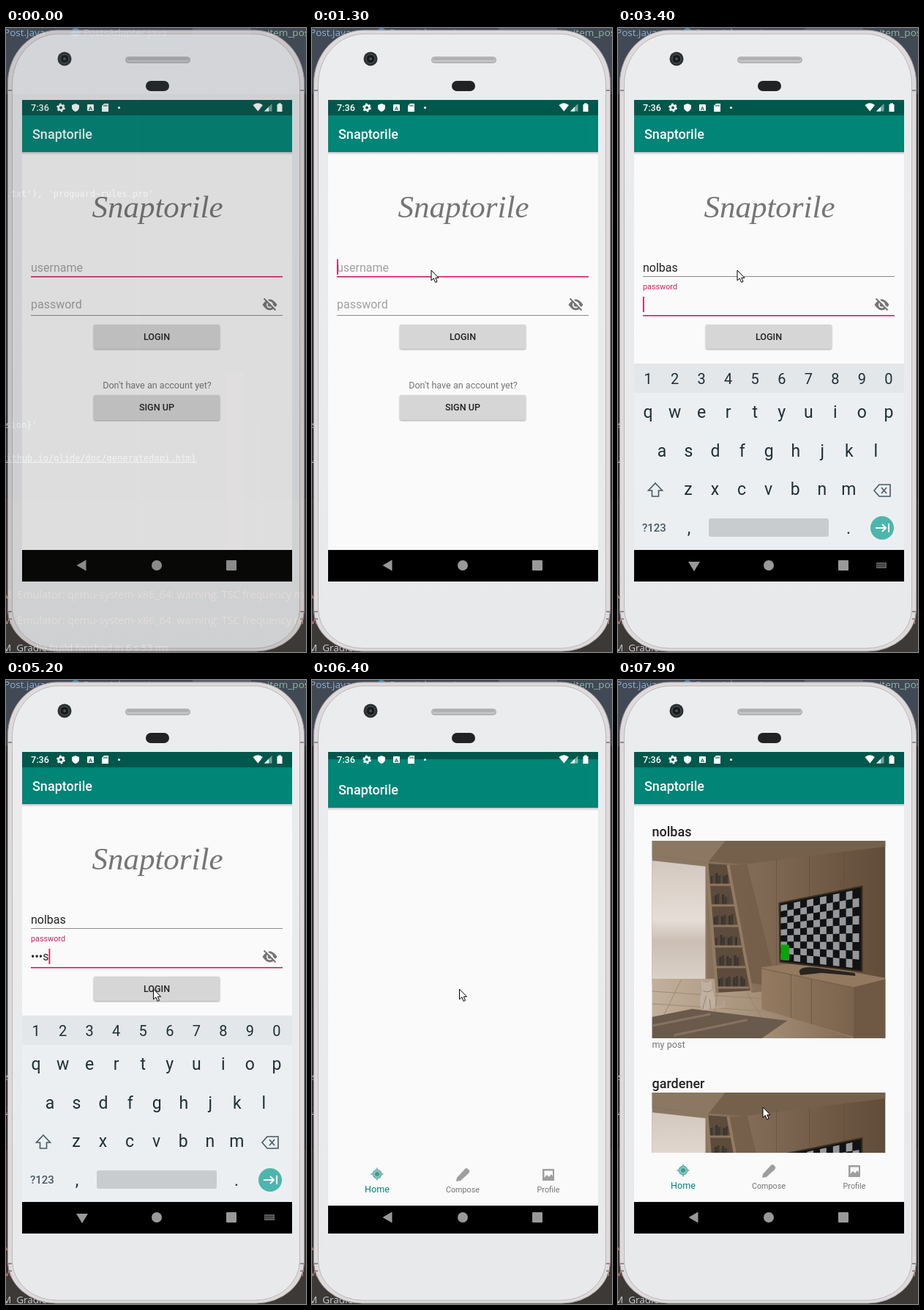
Recreate the animation shown at these times as an HTML page. Size 410x850 px, loop 8000 ms.

```html
<!DOCTYPE html>
<html lang="en">
<head>
<meta charset="utf-8">
<title>Login walkthrough</title>
<style>
  html, body { margin: 0; width: 100%; height: 100%; overflow: hidden; background: #34373c; }
  svg { display: block; width: 410px; height: 850px; }
  text { font-family: Roboto, sans-serif; font-size: 16px; white-space: pre; }
  .mid { text-anchor: middle; }
  .bold { font-weight: 500; }
  .title { font-size: 18px; font-weight: 500; }
  .small { font-size: 12.6px; }
  .tiny { font-size: 10.8px; }
  .grey { fill: #757575; }
  .code text { font: 12px "DejaVu Sans Mono", monospace; fill: #c8ccd2; }
  .code .ui { font: 13.5px "Open Sans", sans-serif; }
  .code .log { font: 14.3px "Open Sans", sans-serif; fill: #c98a82; }
  .logo { font: italic 43px "Liberation Serif", serif; fill: #757575; }
  .key { font-size: 23px; fill: #1f2f36; text-anchor: middle; }
  .num { font-size: 20px; }
  .drop { filter: drop-shadow(0 1px 1px rgba(0, 0, 0, .35)); }
</style>
</head>
<body>
<svg viewBox="0 0 410 850">
  <defs>
    <linearGradient id="body" x2="0" y2="1">
      <stop offset="0" stop-color="#ebecee"/><stop offset="1" stop-color="#e8e9eb"/>
    </linearGradient>
    <linearGradient id="wall">
      <stop offset="0" stop-color="#8f7a67"/><stop offset=".5" stop-color="#7f6853"/><stop offset="1" stop-color="#614c39"/>
    </linearGradient>
    <linearGradient id="glass" x2="0" y2="1">
      <stop offset="0" stop-color="#d3c8bf"/><stop offset=".5" stop-color="#e6ddd6"/>
      <stop offset=".68" stop-color="#cbbfb4"/><stop offset="1" stop-color="#dad0c7"/>
    </linearGradient>
    <linearGradient id="floor">
      <stop offset="0" stop-color="#c3b09c"/><stop offset=".5" stop-color="#a58f79"/><stop offset="1" stop-color="#7d6752"/>
    </linearGradient>
    <linearGradient id="wood">
      <stop offset="0" stop-color="#947a61"/><stop offset="1" stop-color="#7b634d"/>
    </linearGradient>
    <linearGradient id="under" x2="0" y2="1">
      <stop offset="0" stop-opacity=".22"/><stop offset="1" stop-opacity="0"/>
    </linearGradient>
    <clipPath id="screen"><rect x="22" y="98" width="369" height="656"/></clipPath>
    <clipPath id="app"><rect x="22" y="98" width="369" height="613"/></clipPath>
    <clipPath id="button"><rect x="120" y="404" width="172" height="33" rx="2"/></clipPath>
    <clipPath id="frame"><rect width="319" height="269"/></clipPath>

    <g id="room" clip-path="url(#frame)">
      <rect width="319" height="269" fill="url(#wall)"/>
      <path d="M0 0H319V8L126 32L0 22Z" fill="#75604c"/>
      <path d="M0 0H100L76 30L0 20Z" fill="#8c7763"/>
      <path d="M0 20L76 31V196H0Z" fill="#8b7763"/>
      <path d="M0 27L73 35V188H0Z" fill="url(#glass)"/>
      <path d="M0 188H90L150 196L290 269H0Z" fill="url(#floor)"/>
      <path d="M0 205L150 215M0 222L200 235M40 189L15 240M90 200L85 240M130 207L155 250" stroke="#917c67" opacity=".7" fill="none"/>
      <path d="M0 240L55 229L185 245L150 269H0Z" fill="#6a5a4c"/>
      <path d="M0 252L80 236M30 265L130 244" stroke="#857362" stroke-width="3"/>
      <path d="M130 32L172 203L136 207L104 33Z" fill="#6c5642" opacity=".55"/>
      <path d="M75 31L104 33L136 204L88 207Z" fill="#5d4c3c"/>
      <g id="shelves"></g>
      <path d="M75 31L89 207M104 33L136 204" stroke="#937a62" stroke-width="4"/>
      <path d="M170 24V172M215 20V75M262 14V65" stroke="#523f2f" opacity=".35"/>
      <path d="M150 172L205 166L319 187V269H275L150 229Z" fill="#937960"/>
      <path d="M150 174L275 200V267L150 229Z" fill="url(#wood)"/>
      <path d="M275 200L319 189V269H275Z" fill="#705944"/>
      <path d="M190 182V241M218 188V250M150 174L275 200L319 189" stroke="#65503c" stroke-opacity=".7" fill="none"/>
      <path d="M201 178Q203 170 226 173L277 180L278 184L232 180L203 183Z" fill="#29241f"/>
      <path d="M174 85L287 62V178L175 165Z" fill="#15130f" stroke="#3a3020" stroke-width="2"/>
      <g id="checks"></g>
      <path d="M82 226Q101 230 98 218" fill="none" stroke="#b3a291" stroke-width="3"/>
      <path d="M67 189L71 193H77L81 189L82 202Q89 217 85 228L68 231Q63 218 68 205Z" fill="#c0b0a0"/>
      <path d="M69 230L74 211M80 229L79 216M70 204Q76 208 82 203" fill="none" stroke="#8f7f70"/>
    </g>
    <g id="home-art" fill="#62b1a8">
      <circle r="6.500"/>
      <path d="M-.8-8.500H.8V8.500H-.8ZM-8.500-.8H8.500V.8H-8.500Z"/>
      <circle r="4.200" fill="none" stroke="#c2e0dc" stroke-width=".8"/><circle r="2.500" fill="#3d9a90"/>
    </g>
  </defs>

  <!-- desktop behind the phone -->
  <g class="code">
    <rect width="410" height="850" fill="#2f3136"/>
    <rect width="410" height="90" fill="#414954"/>
    <rect y="640" width="410" height="210" fill="#3c3936"/>
    <rect x="255" y="0" width="80" height="12" fill="#59636e"/>
    <rect x="300" y="470" width="25" height="242" fill="#45383a"/>
    <path d="M180 90V710M345 540V710" stroke="#4a4a4f"/>
    <text class="ui" x="-3" y="11" style="fill:#8eb1d6">Post.java</text>
    <circle cx="95" cy="6" r="6" fill="#4d91b8"/>
    <text class="ui" x="106" y="11" style="fill:#8eb1d6">PostsAdapter.java</text>
    <text class="ui" x="357" y="11" style="fill:#8fb9a5">item_post.xml</text>
    <text x="-15" y="230">te.txt'), 'proguard-rules.pro'</text>
    <text x="-8" y="545">rsion}'</text>
    <text x="-7" y="590" text-decoration="underline">github.io/glide/doc/generatedapi.html</text>
    <text class="log" x="-5" y="777">M  Emulator: qemu-system-x86_64: warning: TSC frequency m</text>
    <text class="log" x="-5" y="812">M  Emulator: qemu-system-x86_64: warning: TSC frequency m</text>
    <text class="ui" x="-5" y="849">M  Gradle build finished in 6 s 53 ms</text>
  </g>

  <g id="phone">
    <path d="M2.500 75A68 72 0 0 1 70.500 3H339.500A68 72 0 0 1 407.500 75V792A66 57 0 0 1 341.500 849H68.500A66 57 0 0 1 2.500 792Z" fill="#dedadb" stroke="#a69d9f"/>
    <path d="M8.500 77A63 69 0 0 1 71.500 8H338.500A63 69 0 0 1 401.500 77V791A61 54 0 0 1 340.500 845H69.500A61 54 0 0 1 8.500 791Z" fill="url(#body)" stroke="#bdb6b8"/>
    <path d="M3 85H8M402 85H407M3 795H8M402 795H407M3 805H8M402 805H407" stroke="#918b8d" stroke-width="2"/>
    <circle cx="80" cy="42" r="9.5" fill="#2d3031"/>
    <circle cx="80" cy="42" r="6" fill="#17191b" stroke="#565b5d"/>
    <circle cx="80" cy="42" r="2" fill="#46525d"/>
    <rect x="163.5" y="39.5" width="88" height="8" rx="4" fill="#c1c1c3" stroke="#a5a5a7"/>
    <path d="M166 42H249" stroke="#909092"/>
    <rect x="191" y="72" width="32" height="14" rx="7" fill="#202223"/>

    <g clip-path="url(#screen)">
      <rect x="22" y="98" width="369" height="656"/>

      <g id="login" clip-path="url(#app)">
        <rect x="22" y="98" width="369" height="613" fill="#fafafa"/>
        <rect x="22" y="98" width="369" height="71" fill="#008577"/>
        <rect x="22" y="169" width="369" height="4" fill="url(#under)"/>
        <text class="title" x="36" y="151" fill="#fff">Snaptorile</text>
        <text class="logo mid" x="207" y="258">Snaptorile</text>

        <text id="user" x="34" y="332"></text>
        <rect id="user-line" x="34" width="344"/>
        <text id="pass-hint" x="34" y="382" fill="#a0a0a0">password</text>
        <text id="pass-label" class="tiny" x="34" y="356" fill="#d81b60">password</text>
        <text id="pass" x="34" y="382" fill="#222"></text>
        <rect id="pass-line" x="34" width="344"/>
        <rect id="caret" width="1.8" height="21" fill="#d81b60"/>
        <g fill="#757575">
          <path d="M350.500 377Q360.500 362 370.500 377Q360.500 392 350.500 377Z"/>
          <circle cx="360.500" cy="377" r="4.500" fill="#fafafa"/>
          <circle cx="360.500" cy="377" r="2.800"/>
          <path d="M354 367.500L370 383.500" stroke="#fafafa" stroke-width="2"/>
          <path d="M352.500 368.500L368.500 384.500" stroke="#757575" stroke-width="2"/>
        </g>

        <g fill="#d6d6d6" class="drop">
          <rect x="120" y="404" width="172" height="33" rx="2"/>
          <rect x="120" y="500" width="172" height="34" rx="2"/>
        </g>
        <circle id="ripple" cx="206" cy="421" fill-opacity=".1" clip-path="url(#button)"/>
        <g class="mid" fill="#222">
          <text class="small bold" x="206" y="425">LOGIN</text>
          <text class="small grey" x="206.500" y="491">Don't have an account yet?</text>
          <text class="small bold" x="206" y="521">SIGN UP</text>
        </g>
      </g>

      <g clip-path="url(#app)">
        <g id="keyboard">
          <rect x="22" y="457" width="369" height="254" fill="#eceff1"/>
          <rect x="22" y="457" width="369" height="40" fill="#e4e7e9"/>
          <g id="digits"></g>
          <g id="letters"></g>
          <g fill="none" stroke="#455a64" stroke-width="1.600">
            <path d="M51 620L60.500 630H55.500V638H46.500V630H41.500Z"/>
            <path d="M357 622H372V638H357L350 630ZM360 626L367 634M367 626L360 634"/>
          </g>
          <text x="33" y="686" class="bold" style="font-size:15px" fill="#455a64">?123</text>
          <text class="key" x="97" y="689">,</text>
          <text class="key" x="315" y="689">.</text>
          <rect x="124" y="668" width="164" height="25" rx="3" fill="#c8cccf"/>
          <circle cx="361" cy="681" r="16" fill="#4db6ac"/>
          <path d="M352 681H366M361 676L366 681L361 686M370 675V687" fill="none" stroke="#fff" stroke-width="2"/>
        </g>
      </g>

      <g id="home">
        <rect x="22" y="98" width="369" height="613" fill="#fafafa"/>
        <rect x="22" y="98" width="369" height="71" fill="#008577"/>
        <rect x="22" y="169" width="369" height="4" fill="url(#under)"/>
        <text class="title" x="36" y="151" fill="#fff">Snaptorile</text>
        <g id="feed" clip-path="url(#app)" fill="#222">
          <text class="title" x="46.500" y="213">nolbas</text>
          <text class="small grey" x="46.500" y="501">my post</text>
          <text class="title" x="46.500" y="556">gardener</text>
          <use id="photo1" href="#room" x="46.500" y="219"/>
          <use id="photo2" href="#room" x="46.500" y="562"/>
        </g>
        <rect x="22" y="644" width="369" height="67" fill="#fafafa"/>
        <use href="#home-art" x="89" y="668"/>
        <g fill="#9e9e9e">
          <path d="M198 673L209 661Q211 659 213 661L215 663Q216 665 214 667L203 677L197 678Z"/>
          <path d="M315 661H331V677H315ZM317.500 663.500V673L321 669L324 672L327 668L329 671V663.500Z" fill-rule="evenodd"/>
        </g>
        <text class="small mid" x="89" y="692.500" fill="#008577">Home</text>
        <text class="tiny mid grey" x="206" y="692.500">Compose</text>
        <text class="tiny mid grey" x="323" y="692.500">Profile</text>
      </g>

      <!-- system bars -->
      <rect id="shade" x="22" y="98" width="369" fill="#00574b"/>
      <g fill="#fff">
        <text class="small bold" x="34" y="113">7:36</text>
        <circle cx="75" cy="108.500" r="3.300" fill="none" stroke="#fff" stroke-width="2.600"/>
        <circle cx="75" cy="108.500" r="5" fill="none" stroke="#fff" stroke-width="1.800" stroke-dasharray="2.600 2.636"/>
        <path d="M95 103L100 105V108Q100 112 95 114Q90 112 90 108V105Z"/>
        <rect x="111" y="104" width="9" height="9" rx="1"/>
        <text class="mid bold" x="115.500" y="111.500" style="font-size:8px" fill="#00574b">A</text>
        <path d="M134 103H140V114H131V106Z"/>
        <path d="M134 104.500V107M136 104.500V107M138 104.500V107" stroke="#00574b"/>
        <circle cx="154.500" cy="108.500" r="1.600"/>
        <path d="M337.500 105Q344 99.500 351 105L344.300 113.500Z"/>
        <path d="M363.500 103V113.500H353Z" opacity=".45"/><path d="M359 107.500V113.500H353Z"/>
        <path d="M372 102.500H376V104H377.500V114H370.500V104H372Z"/>
      </g>
      <g fill="#999">
        <path id="back" d="M96.500 732L109.500 724.500V739.500Z"/>
        <g id="hide-keys">
          <path d="M96 727H112L104 740Z"/>
          <path d="M353 728H367V736H353Z" opacity=".6"/>
          <path d="M354 730.500H366M354 733H366" stroke="#000" stroke-dasharray="1 1"/>
        </g>
        <circle cx="206" cy="732" r="7"/>
        <rect x="301" y="725" width="14" height="14" rx="1"/>
      </g>
    </g>
    <path id="mouse" d="M0 0V14L3.300 11L5.600 16.500L8 15.500L5.800 10.300H10Z" fill="#fff" stroke="#000"/>
  </g>
</svg>

<script>
const $ = id => document.getElementById(id);
const pink = '#d81b60';

function add(parent, tag, attrs, text = '') {
  const el = document.createElementNS('http://www.w3.org/2000/svg', tag);
  for (const name in attrs) el.setAttribute(name, attrs[name]);
  el.textContent = text;
  $(parent).append(el);
}

function keyRow(parent, keys, x, y, cls = 'key') {
  [...keys].forEach((k, i) => add(parent, 'text', { class: cls, x: x + 36.55 * i, y }, k));
}
keyRow('digits', '1234567890', 41, 485, 'key num');
keyRow('letters', 'qwertyuiop', 41, 531);
keyRow('letters', 'asdfghjkl', 60, 584);
keyRow('letters', 'zxcvbnm', 96, 636);

// Ladder shelf: books between two leaning rails
for (let s = 0; s < 6; s++) {
  const y = 60 + 28 * s, left = 77 + 2.1 * s, right = 108 + 4.9 * s;
  for (let x = left + 3, i = 0; x < right - 7; x += 3.4, i++) {
    const h = 12 + (i * 7 + s * 5) % 5;
    add('shelves', 'rect', { x, y: y - h, width: 3, height: h, fill: ['#40372f', '#554840', '#39342f'][(i + s) % 3] });
  }
  add('shelves', 'path', { d: `M${left} ${y}H${right}`, stroke: '#8f765e', 'stroke-width': 3 });
}

// Chequered picture mapped onto the slanted television
const cols = 12, rows = 9;
const onTv = (c, r) => {
  const u = c / cols, v = r / rows;
  const top = 88 - 22 * u, bottom = 162 + 12 * u;
  return `${176 + 107 * u} ${top + (bottom - top) * v}`;
};
const cell = (c, r, w, h, fill) => add('checks', 'path', {
  d: `M${onTv(c, r)}L${onTv(c + w, r)}L${onTv(c + w, r + h)}L${onTv(c, r + h)}Z`, fill
});
for (let r = 0; r < rows; r++)
  for (let c = 0; c < cols; c++) cell(c, r, 1, 1, (r + c) % 2 ? '#111214' : '#96979a');
cell(0, 6.5, 1.3, 2.5, '#08a508');

const attr = (id, name) => v => $(id).setAttribute(name, v);
const show = id => v => { $(id).style.display = v ? '' : 'none'; };
const move = id => ([x, y]) => $(id).setAttribute('transform', `translate(${x} ${y})`);
const text = id => v => { $(id).textContent = v; };
const line = (id, y) => focused => {
  $(id).setAttribute('y', y);
  $(id).setAttribute('height', focused ? 1.6 : 1);
  $(id).setAttribute('fill', focused ? pink : '#8a8a8a');
};

// Each track holds a value from its time (ms) until the next one
const tracks = [
  [attr('phone', 'opacity'), { 0: 0.86, 1300: 1 }],
  [show('mouse'), { 0: 0, 100: 1 }],
  [move('mouse'), {
    0: [168, 127], 200: [166, 240], 300: [163, 332], 600: [163, 340], 700: [163, 346],
    900: [163, 341], 1000: [163, 334], 1100: [163, 330],
    4800: [190, 350], 4900: [235, 390], 5000: [268, 410], 5100: [235, 420], 5200: [201.5, 421],
    6800: [203, 413], 6900: [203, 404], 7000: [200, 370], 7100: [185, 340], 7200: [165, 318], 7300: [155, 313],
    7500: [190, 312], 7600: [228, 380], 7700: [226, 470], 7800: [210, 550], 7900: [198, 582]
  }],
  [text('user'), { 0: 'username', 3400: 'nolbas' }],
  [attr('user', 'fill'), { 0: '#a0a0a0', 3400: '#222' }],
  [line('user-line', 338), { 0: 1, 3400: 0 }],
  [show('pass-hint'), { 0: 1, 3400: 0 }],
  [show('pass-label'), { 0: 0, 3400: 1 }],
  [line('pass-line', 391), { 0: 0, 3400: 1 }],
  [text('pass'), { 0: '', 3700: 'p', 3800: '•a', 3900: '••s', 4100: '•••s', 5500: '••••' }],
  [show('caret'), { 0: 0, 600: 1, 1100: 0, 1300: 1, 1900: 0, 2100: 1, 4800: 0, 5200: 1 }],
  [move('caret'), {
    0: [34, 315], 3400: [34, 366], 3700: [43, 366], 3800: [48, 366],
    3900: [53, 366], 4100: [58.5, 366], 5500: [56, 366]
  }],
  [show('keyboard'), { 0: 0, 1500: 1, 6200: 0 }],
  [move('keyboard'), { 0: [0, 180], 1600: [0, 90], 1700: [0, 35], 1800: [0, 10], 1900: [0, 0], 6100: [0, 100] }],
  [show('digits'), { 0: 0, 3400: 1 }],
  [show('back'), { 0: 1, 1500: 0, 6200: 1 }],
  [show('hide-keys'), { 0: 0, 1500: 1, 6200: 0 }],
  [attr('ripple', 'r'), { 0: 0, 5500: 40, 5600: 73 }],
  [show('login'), { 0: 1, 6600: 0 }],
  [show('home'), { 0: 0, 6200: 1 }],
  [move('home'), { 0: [0, 27], 6300: [0, 14], 6400: [0, 5], 6500: [0, 1], 6600: [0, 0] }],
  [attr('shade', 'height'), { 0: 21, 6200: 14, 6400: 10, 6500: 18, 6600: 21 }],
  [show('feed'), { 0: 0, 6600: 1 }],
  [show('photo1'), { 0: 0, 6800: 1 }],
  [show('photo2'), { 0: 0, 7000: 1 }]
].map(([apply, keys]) => [apply, Object.entries(keys)]);

function draw() {
  const t = performance.now() % 8000;
  for (const [apply, keys] of tracks) apply(keys.findLast(([at]) => at <= t)[1]);
  requestAnimationFrame(draw);
}
draw();
</script>
</body>
</html>
```
